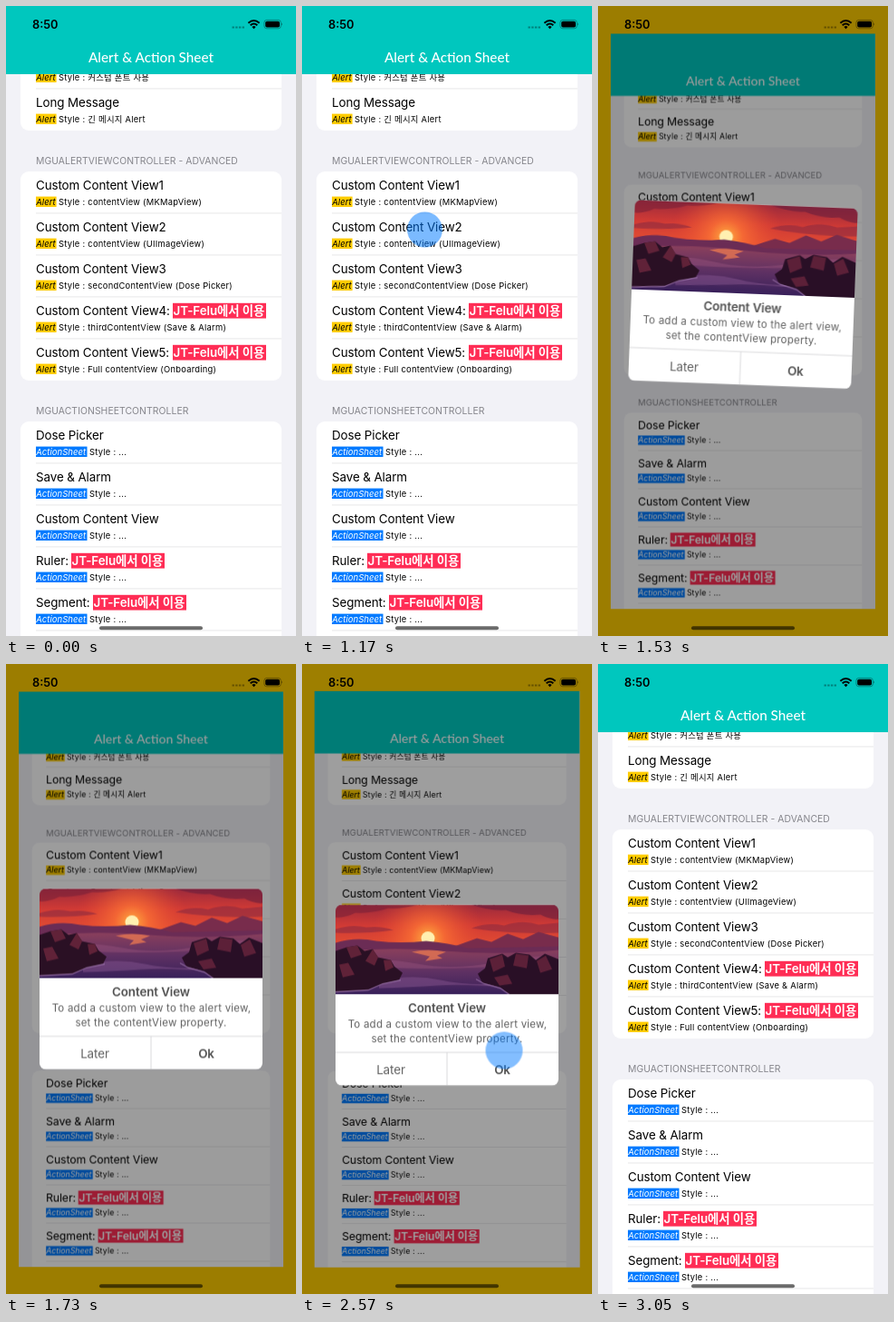
An HTML page for the animation above (3.1 s loop, 320 px wide and 693 px high).

```html
<!DOCTYPE html>
<html lang="ko">
<head>
<meta charset="utf-8">
<title>Alert &amp; Action Sheet</title>
<style>
html, body { margin: 0; width: 100%; height: 100%; overflow: hidden; background: #fc0; }
svg { display: block; width: 100vw; height: 100vh; }
text { font-family: Inter, 'Noto Sans CJK KR', 'Noto Sans CJK', sans-serif; white-space: pre; }
.title { font-size: 13.4px; letter-spacing: -.1px; }
.sub { font-size: 9.4px; letter-spacing: .25px; }
.tag { font-size: 9.6px; font-style: italic; }
.head { font-size: 10.4px; letter-spacing: .06px; fill: #85858b; }
.bold { font-weight: 600; }
.body { font-size: 11.5px; letter-spacing: .22px; }
.mid { text-anchor: middle; }
.nav { font: 500 15.3px Lato, sans-serif; fill: #fff; text-anchor: middle; }
.clock { font-size: 12.8px; font-weight: 600; }

#screen, #dim, #mark, #alert, .touch { animation: 3100ms linear infinite; }
#screen { transform-origin: 160px 346.5px; animation-name: shrink; }
#dim { animation-name: dim; }
#mark { animation-name: mark; }
#alert { animation-name: drop; }
#tap1 { animation-name: tap1; }
#tap2 { animation-name: tap2; }

@keyframes shrink {
  0%, 40.161% { transform: scale(1); animation-timing-function: ease-in-out; }
  48.226%, 82.097% { transform: scale(.912); animation-timing-function: ease-in-out; }
  90.161%, 100% { transform: scale(1); }
}
@keyframes dim {
  0%, 40.161% { opacity: 0; animation-timing-function: ease-in-out; }
  48.226%, 82.097% { opacity: .39; animation-timing-function: ease-in-out; }
  90.161%, 100% { opacity: 0; }
}
@keyframes mark {
  0%, 39.8% { opacity: 0; }
  39.81%, 45.5% { opacity: 1; }
  49%, 100% { opacity: 0; }
}
/* critically damped spring in, eased fall out */
@keyframes drop {
  0%, 43.387% {
    transform: translate(0, -640px) rotate(48deg);
    animation-timing-function: linear(0, .09, .264, .442, .594, .713, .801, .864, .908, .939, .96, .973, .983, .989, .993, .995, .997, 1);
  }
  53.871%, 82.097% { transform: translate(0, 0) rotate(0deg); animation-timing-function: ease-in-out; }
  90.161%, 100% { transform: translate(0, 830px) rotate(0deg); }
}
@keyframes tap1 {
  0%, 37.6% { opacity: 0; transform: scale(.78); }
  37.61%, 40.161% { opacity: .52; transform: scale(.78); }
  44.194% { opacity: .36; transform: scale(1.01); }
  47% { opacity: 0; transform: scale(1.1); }
  100% { opacity: 0; transform: scale(.78); }
}
@keyframes tap2 {
  0%, 76.4% { opacity: 0; transform: scale(.78); }
  76.41%, 82.097% { opacity: .52; transform: scale(.78); }
  86.129% { opacity: .36; transform: scale(.97); }
  89% { opacity: 0; transform: scale(1.1); }
  100% { opacity: 0; transform: scale(.78); }
}
</style>
</head>
<body>
<svg viewBox="0 0 320 693" preserveAspectRatio="none">
  <defs>
    <clipPath id="page"><rect width="320" height="693"/></clipPath>
    <clipPath id="card"><rect x="-123" y="-99.5" width="246" height="199" rx="7"/></clipPath>
    <clipPath id="pic"><rect width="246" height="98.5"/></clipPath>
    <linearGradient id="sky" x2="0" y2="1">
      <stop offset="0" stop-color="#9c2a3c"/>
      <stop offset=".4" stop-color="#d03a35"/>
      <stop offset="1" stop-color="#ec5731"/>
    </linearGradient>
    <radialGradient id="glow">
      <stop offset="0" stop-color="#ffb040"/>
      <stop offset=".3" stop-color="#fb7034" stop-opacity=".8"/>
      <stop offset="1" stop-color="#e64430" stop-opacity="0"/>
    </radialGradient>
    <linearGradient id="sea" x2="0" y2="1">
      <stop offset="0" stop-color="#8a3f5c"/>
      <stop offset=".5" stop-color="#5f3163"/>
      <stop offset="1" stop-color="#38205a"/>
    </linearGradient>
  </defs>

  <rect width="320" height="693" fill="#fc0"/>

  <g id="screen"><g clip-path="url(#page)">
    <rect width="320" height="693" fill="#f2f2f7"/>
    <g id="list"></g>
    <rect width="320" height="75" fill="#00c7be"/>
    <text class="nav" x="160" y="62">Alert &amp; Action Sheet</text>
  </g></g>

  <rect id="dim" width="320" height="693" opacity="0"/>

  <g transform="translate(160 346.5)"><g id="alert"><g clip-path="url(#card)">
    <rect x="-123" y="-99.5" width="246" height="199" fill="#fff"/>
    <g transform="translate(-123 -99.5)">
      <g clip-path="url(#pic)">
        <rect width="246" height="56" fill="url(#sky)"/>
        <circle cx="102" cy="37" r="62" fill="url(#glow)"/>
        <path d="M0 0H92Q74 5 58 4Q40 10 22 9Q10 15 0 14Z" fill="#7a2038" opacity=".6"/>
        <path d="M246 0H150Q168 7 188 6Q206 13 226 11Q238 17 246 16Z" fill="#6e1f3c" opacity=".65"/>
        <path d="M0 27Q18 21 34 25Q50 23 64 28Q34 32 0 31ZM150 26Q168 19 186 23Q206 16 224 22L246 20V31Q196 33 150 26Z" fill="#8c2a40" opacity=".6"/>
        <circle cx="102" cy="37" r="7.5" fill="#fff0b0"/>
        <path d="M128 47L156 37 172 41 190 32 207 38 224 30 246 36V54H128Z" fill="#782c4c"/>
        <path d="M0 42Q22 35 45 40Q72 43 100 40Q124 42 146 48L246 46V60H0Z" fill="#6b2c55"/>
        <path d="M0 52Q60 46 120 51T246 50V99H0Z" fill="url(#sea)"/>
        <path d="M84 52Q102 48 122 52L112 56 118 59 99 62 104 57Z" fill="#ee7a50" opacity=".75"/>
        <path d="M0 64Q50 57 90 65T178 63T246 60V65Q200 67 160 69T78 70T0 68Z" fill="#94507a" opacity=".5"/>
        <path d="M48 84Q84 76 116 83T188 86V91Q142 87 112 89T48 92Z" fill="#80508a" opacity=".55"/>
        <path d="M0 51L12 47 24 45 32 51 41 49 47 58 61 61 65 68 74 75 70 83 52 87 36 94 0 96Z" fill="#2a1024"/>
        <path d="M12 47L24 45 29 55 17 59ZM41 49L47 58 43 67 33 62ZM53 61L61 61 64 69 55 73ZM4 66L14 64 21 77 8 80Z" fill="#602238"/>
        <path d="M246 60L231 54 221 61 214 55 199 53 190 58 184 54 168 59 165 70 157 76 162 86 182 91 192 99H246Z" fill="#290f26"/>
        <path d="M170 60L184 55 187 68 174 74ZM199 54L213 56 211 70 196 67ZM222 62L232 56 239 71 226 75ZM175 80L190 77 195 87 181 89Z" fill="#5c2038"/>
        <path d="M0 96L36 94 52 87 72 83M155 82L164 87 182 92 192 99" fill="none" stroke="#9a72a8" stroke-width="1.3" opacity=".75"/>
      </g>
      <text class="title bold mid" x="123" y="118.5" fill="#505050">Content View</text>
      <g class="body mid" fill="#606060">
        <text x="123.5" y="135.2">To add a custom view to the alert view,</text>
        <text x="123" y="151.7">set the contentView property.</text>
      </g>
      <path d="M0 162.5H246M123 162.5V199" stroke="#d6d6d8" stroke-width=".9"/>
      <text class="title mid" x="61" y="186" fill="#606060">Later</text>
      <text class="title bold mid" x="184" y="186" fill="#505050">Ok</text>
    </g>
  </g></g></g>

  <g fill="#007aff">
    <g transform="translate(135.5 246)"><circle id="tap1" class="touch" r="25" opacity="0"/></g>
    <g transform="translate(223 425)"><circle id="tap2" class="touch" r="25" opacity="0"/></g>
  </g>

  <text class="clock" x="29" y="24.7">8:50</text>
  <path d="M249.5 23.5H263" stroke="#000" stroke-opacity=".35" stroke-width="2" stroke-dasharray="2.4 1.3"/>
  <g fill="none" stroke="#000" stroke-width="2">
    <path d="M267.4 18.8Q273.5 13.2 279.6 18.8M269.7 21.3Q273.5 17.8 277.3 21.3"/>
  </g>
  <path d="M271.4 22.9Q273.5 21.2 275.6 22.9L273.5 25.2Z"/>
  <rect x="284.9" y="15.4" width="18.4" height="9.4" rx="2.8" fill="none" stroke="#000" stroke-opacity=".4" stroke-width=".8"/>
  <rect x="286.2" y="16.7" width="15.8" height="6.8" rx="1.7"/>
  <path d="M304.2 18.5Q306 20 304.2 21.6Z" fill-opacity=".45"/>
  <rect x="103" y="682.3" width="114" height="4" rx="2" fill-opacity=".58"/>
</svg>

<script>
const ROW = 46;
const BADGE = 'JT-Felu에서 이용';
const kinds = {
  Alert: { width: 22.6, fill: '#fc0', color: '#000', next: 58 },
  ActionSheet: { width: 56.5, fill: '#007aff', color: '#fff', next: 92 }
};

const rect = (x, y, w, h, fill, more = '') =>
  `<rect x="${x}" y="${y}" width="${w}" height="${h}" fill="${fill}" ${more}/>`;
const text = (cls, x, y, str, fill = '') =>
  `<text class="${cls}" x="${x}" y="${y}"${fill && ` fill="${fill}"`}>${str}</text>`;
const line = y => rect(33, y - .4, 271, .7, '#dcdcdf');

// A row is [title, detail, x of the badge if it has one].
function row(kind, [title, detail, badge], y) {
  const k = kinds[kind];
  let out = text('title', 33, y + 20.2, title);
  if (badge) {
    out += rect(badge, y + 6.8, 103, 16.8, '#ff2d55');
    out += text('title bold', badge + .6, y + 20.2, BADGE, '#fff');
  }
  return out + rect(33, y + 27.6, k.width, 11.4, k.fill)
    + text('tag', 33.2, y + 36.7, kind, k.color)
    + text('sub', k.next, y + 36.7, 'Style : ' + detail);
}

function section(kind, y, rows, extra = 0, under = '') {
  let out = rect(16, y, 288, rows.length * ROW + extra, '#fff', 'rx="9"') + under;
  rows.forEach((r, i) => {
    const top = y + i * ROW;
    if (i) out += line(top);
    out += row(kind, r, top);
  });
  return extra ? out + line(y + rows.length * ROW) : out;
}

document.getElementById('list').innerHTML =
  section('Alert', 45, [
    ['Custom Font', '커스텀 폰트 사용'],
    ['Long Message', '긴 메시지 Alert']
  ]) +
  text('head', 33, 174, 'MGUALERTVIEWCONTROLLER - ADVANCED') +
  section('Alert', 182, [
    ['Custom Content View1', 'contentView (MKMapView)'],
    ['Custom Content View2', 'contentView (UIImageView)'],
    ['Custom Content View3', 'secondContentView (Dose Picker)'],
    ['Custom Content View4:', 'thirdContentView (Save &amp; Alarm)', 184],
    ['Custom Content View5:', 'Full contentView (Onboarding)', 184]
  ], 0, rect(16, 228, 288, ROW, '#d1d1d6', 'id="mark" opacity="0"')) +
  text('head', 33, 449, 'MGUACTIONSHEETCONTROLLER') +
  section('ActionSheet', 457, [
    ['Dose Picker', '...'],
    ['Save &amp; Alarm', '...'],
    ['Custom Content View', '...'],
    ['Ruler:', '...', 72],
    ['Segment:', '...', 96]
  ], ROW);
</script>
</body>
</html>
```
